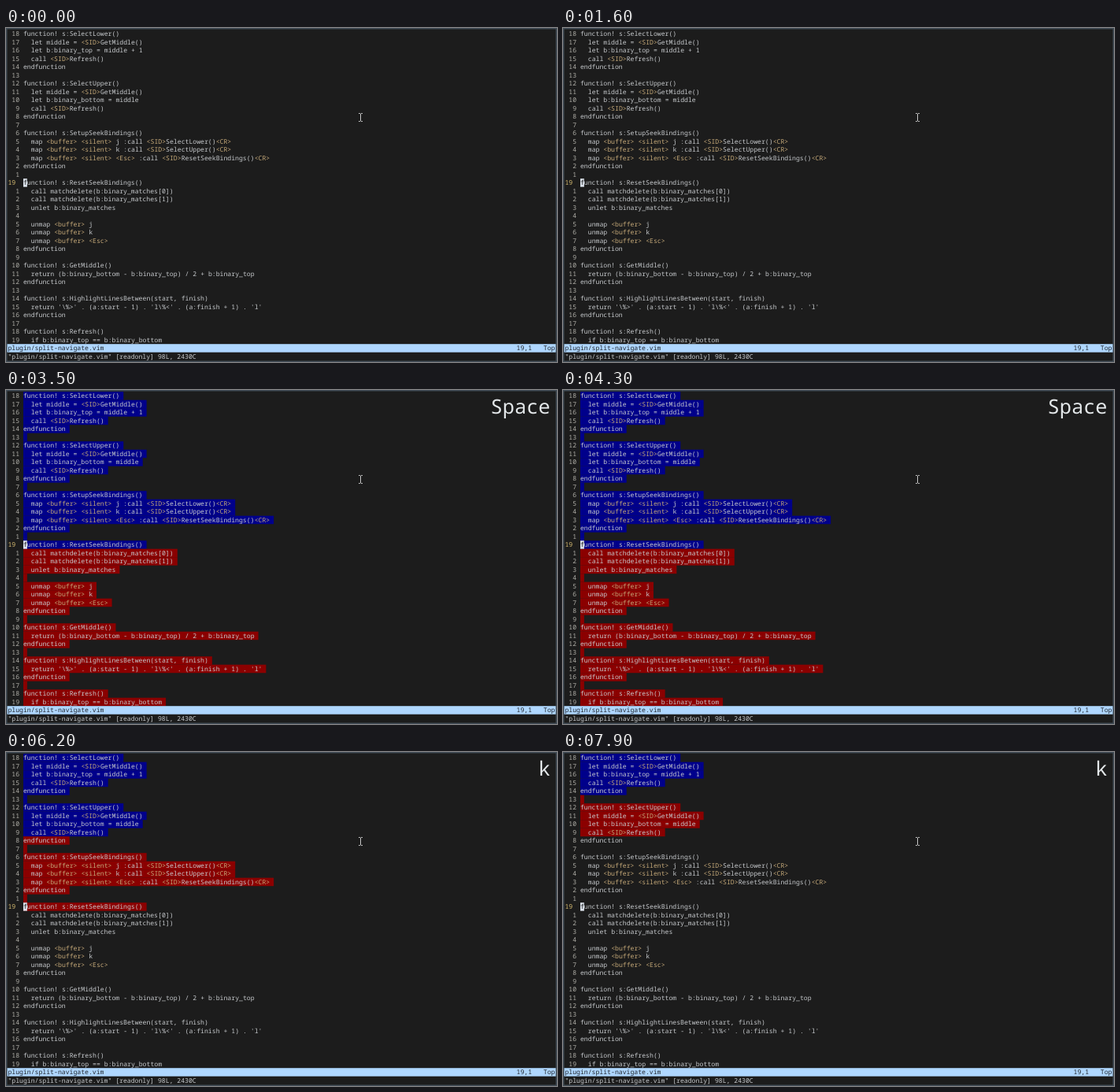
Animation of 700x424 px, one loop 8 s. Source, as an HTML page:

```html
<!DOCTYPE html>
<html lang="en">
<head>
<meta charset="utf-8">
<title>Binary line seek</title>
<style>
html, body { margin: 0; width: 100%; height: 100%; overflow: hidden; background: #1c1c1c; }
svg { display: block; width: 700px; height: 424px; }
text { font-family: "Noto Sans Mono", "DejaVu Sans Mono", monospace; font-size: 8.158px; white-space: pre; text-rendering: geometricPrecision; }
.key { font-size: 25.3px; }
</style>
</head>
<body>
<svg id="stage" viewBox="0 0 700 424"></svg>
<script>
const CODE = String.raw`function! s:SelectLower()
  let middle = <SID>GetMiddle()
  let b:binary_top = middle + 1
  call <SID>Refresh()
endfunction

function! s:SelectUpper()
  let middle = <SID>GetMiddle()
  let b:binary_bottom = middle
  call <SID>Refresh()
endfunction

function! s:SetupSeekBindings()
  map <buffer> <silent> j :call <SID>SelectLower()<CR>
  map <buffer> <silent> k :call <SID>SelectUpper()<CR>
  map <buffer> <silent> <Esc> :call <SID>ResetSeekBindings()<CR>
endfunction

function! s:ResetSeekBindings()
  call matchdelete(b:binary_matches[0])
  call matchdelete(b:binary_matches[1])
  unlet b:binary_matches

  unmap <buffer> j
  unmap <buffer> k
  unmap <buffer> <Esc>
endfunction

function! s:GetMiddle()
  return (b:binary_bottom - b:binary_top) / 2 + b:binary_top
endfunction

function! s:HighlightLinesBetween(start, finish)
  return '\%>' . (a:start - 1) . 'l\%<' . (a:finish + 1) . 'l'
endfunction

function! s:Refresh()
  if b:binary_top == b:binary_bottom`.split("\n");

const LOOP = 8000, LEFT = 2.4, TOP = 2.2, CW = 4.895, RH = 10.5, GUTTER = 4, CURSOR = 18;
const INK = "#c6c9cc", TAN = "#c4a878", BLUE = "#00008b", RED = "#8b0000";

// start time, key label, end of the blue rows, end of the red rows
const STEPS = [
  [0, "", 0, 0],
  [3100, "Space", 19, 38],
  [5600, "k", 10, 19],
  [7000, "k", 5, 10]
];

const stage = document.getElementById("stage");

function add(tag, attrs, content = "") {
  const el = document.createElementNS("http://www.w3.org/2000/svg", tag);
  for (const name in attrs) el.setAttribute(name, attrs[name]);
  el.textContent = content;
  stage.append(el);
  return el;
}

const colX = col => LEFT + col * CW;
const rowY = row => TOP + row * RH;

function box(x, y, width, height, fill) {
  return add("rect", { x, y, width, height, fill });
}

function put(str, col, row, fill = INK) {
  return add("text", { x: colX(col), y: rowY(row) + 8.2, fill }, str);
}

function putCode(line, row) {
  for (const part of line.matchAll(/<\w+>|[^\s<]+|</g)) {
    put(part[0], GUTTER + part.index, row, /^<\w+>$/.test(part[0]) ? TAN : INK);
  }
}

box(0, 0, 700, 424, "#414c56");
box(1.5, 1.5, 697, 421, "#1c1c1c");

const marks = CODE.map((line, row) =>
  box(colX(GUTTER), rowY(row), (line.length + 1) * CW, RH, "none"));

CODE.forEach((line, row) => {
  const here = row === CURSOR;
  const label = here ? "19" : String(Math.abs(row - CURSOR)).padStart(3);
  put(label, 0, row, here ? "#d8bd72" : "#b0afa8");
  putCode(line, row);
});

box(colX(GUTTER), rowY(CURSOR), CW, RH, "#dce3ec");
put("f", GUTTER, CURSOR, "#1c1c1c");

box(1.5, rowY(38), 697, RH, "#afd7ff");
put("plugin/split-navigate.vim", 0, 38, "#20262e");
put("19,1", 132, 38, "#20262e");
put("Top", 139, 38, "#20262e");
put('"plugin/split-navigate.vim" [readonly] 98L, 2430C', 0, 39);

const beam = "M448 108.5h1.7l.8.7.8-.7H453M450.5 109v9M448 118.5h1.7l.8-.7.8.7H453";
add("path", { d: beam, fill: "none", stroke: "#c8c8c8", "stroke-width": 1 });

const key = add("text", { class: "key", x: 691.5, y: 30, fill: "#e4e8ea", "text-anchor": "end" });

let shown;
function draw() {
  const t = performance.now() % LOOP;
  const step = STEPS.findLast(s => s[0] <= t);
  if (step !== shown) {
    const [, label, blueEnd, redEnd] = shown = step;
    key.textContent = label;
    marks.forEach((mark, row) =>
      mark.setAttribute("fill", row < blueEnd ? BLUE : row < redEnd ? RED : "none"));
  }
  requestAnimationFrame(draw);
}
draw();
</script>
</body>
</html>
```
